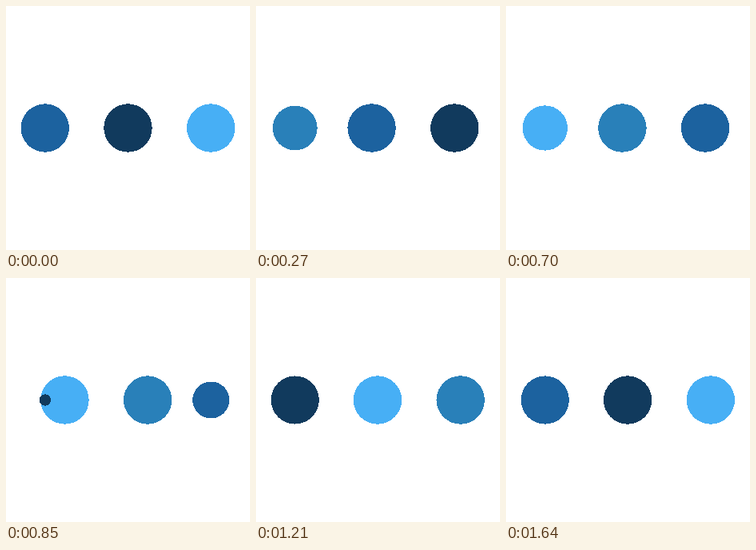
An HTML page without scripts for the animation above (1670 ms loop, 305x305 px).

```html
<!DOCTYPE html>
<html lang="en">
<head>
<meta charset="utf-8">
<title>Loading dots</title>
<style>
  @property --tick {
    syntax: "<number>";
    inherits: true;
    initial-value: 0;
  }

  html, body {
    margin: 0;
    width: 100%;
    height: 100%;
    overflow: hidden;
    background: #fff;
  }

  svg {
    display: block;
    width: 100%;
    height: 100%;
    shape-rendering: crispEdges;
    --light: #47aff5;
    --sky: #2980b9;
    --blue: #1c629f;
    --navy: #113a5d;
    --radius: 30.2px;

    /* 55 ticks per loop, split into four equal phases */
    animation: tick 1670ms -2ms infinite;
    --phase: calc(clamp(0, var(--tick) - 13, 1) + clamp(0, var(--tick) - 27, 1) + clamp(0, var(--tick) - 41, 1));
    --time: clamp(0, var(--tick) * 4 / 55 - var(--phase), 1);

    /* closed form of cubic-bezier(0, .5, .5, 1) */
    --s: calc(1 + 2 * cos(120deg - acos(1 - var(--time)) / 3));
    --eased: calc(1.5 * var(--s) - 0.5 * var(--s) * var(--s) * var(--s));
  }

  circle { cy: 152.5px; }

  /* each dot: hidden, grow, slide to the middle, slide to the right */
  .dot {
    --shift: calc(var(--phase) + var(--start));
    --stage: calc(var(--shift) - 4 * clamp(0, var(--shift) - 3, 1) + var(--eased));
    cx: calc(48.8px + 103.7px * clamp(0, var(--stage) - 2, 2));
    r: calc(var(--radius) * clamp(0, var(--stage) - 1, 1));
  }

  .leaving {
    cx: 256.2px;
    r: calc(var(--radius) * clamp(0, 1 - var(--eased), 1));
    animation: leaving 1670ms -2ms step-end infinite;
  }

  /* two ticks last 40 ms, the others 30 ms */
  @keyframes tick {
    0% { --tick: 0; animation-timing-function: steps(16); }
    28.743% { --tick: 16; animation-timing-function: steps(1); }
    31.138% { --tick: 17; animation-timing-function: steps(30); }
    85.03% { --tick: 47; animation-timing-function: steps(1); }
    87.425% { --tick: 48; animation-timing-function: steps(7); }
    100% { --tick: 55; }
  }

  @keyframes leaving {
    0%, 100% { fill: var(--light); }
    25.15% { fill: var(--navy); }
    50.898% { fill: var(--blue); }
    76.048% { fill: var(--sky); }
  }
</style>
</head>
<body>
<svg viewBox="0 0 305 305">
  <circle class="leaving"/>
  <circle class="dot" style="--start: 0; fill: var(--light)"/>
  <circle class="dot" style="--start: 1; fill: var(--sky)"/>
  <circle class="dot" style="--start: 2; fill: var(--blue)"/>
  <circle class="dot" style="--start: 3; fill: var(--navy)"/>
</svg>
</body>
</html>
```
